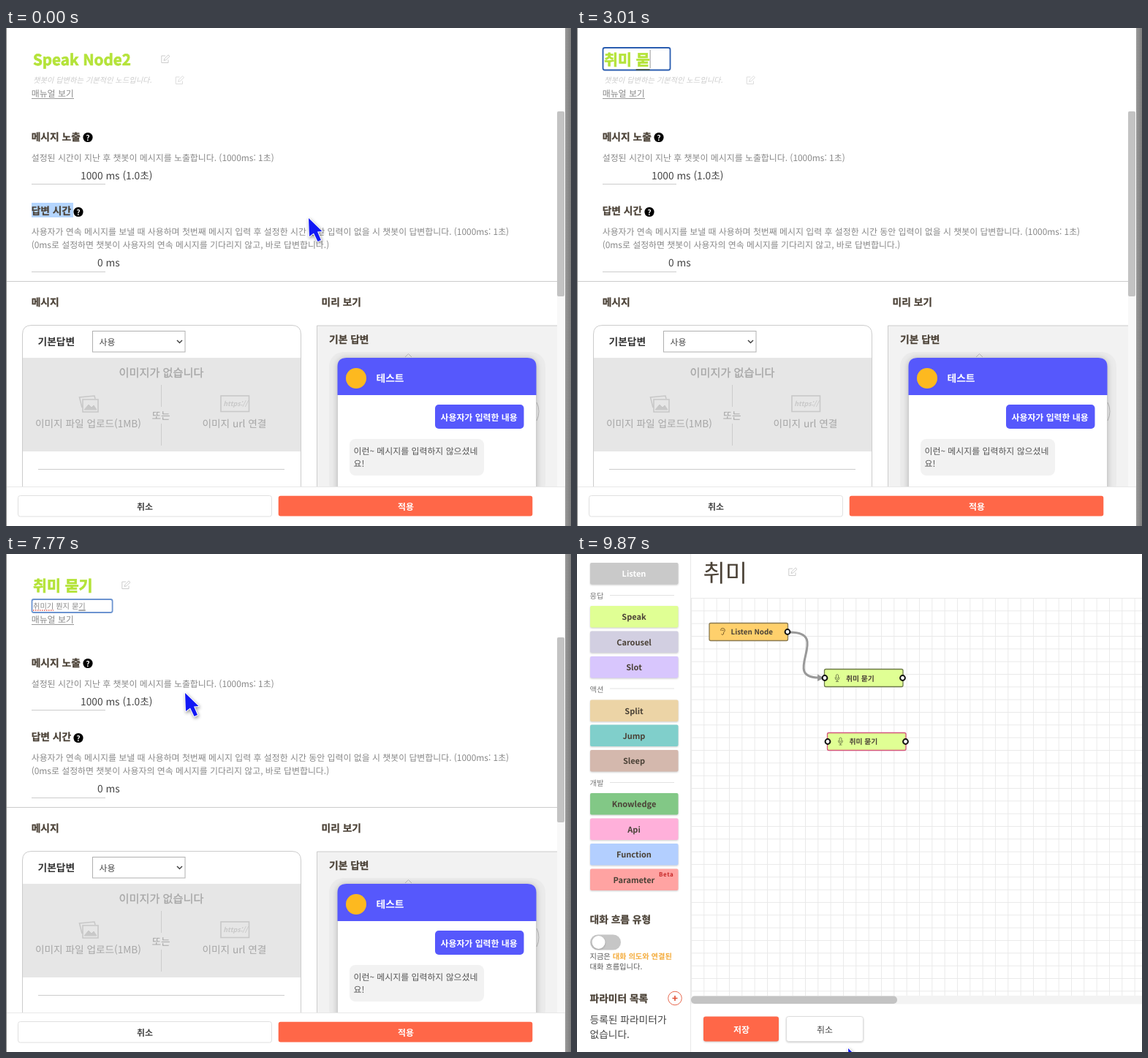
An HTML page for the animation above (9.94 s loop, 773 by 681 pixels).

```html
<!DOCTYPE html>
<html lang="ko">
<head>
<meta charset="utf-8">
<title>Node editor</title>
<style>
html, body { margin: 0; width: 100%; height: 100%; overflow: hidden; background: #fff; }
svg { display: block; width: 773px; height: 681px; }
text { font: 11.92px "Noto Sans CJK KR", "Noto Sans KR", "Noto Sans CJK", sans-serif; fill: #888; white-space: pre; text-rendering: geometricPrecision; }
.h { font-size: 13.75px; font-weight: 700; fill: #4b4237; stroke: #4b4237; stroke-width: .25; }
.b { font-weight: 700; }
.n { font-size: 13.75px; fill: #444; }
.m { text-anchor: middle; }
.g { font-size: 13.65px; fill: #a6a6a6; }
.s { font-size: 10.25px; fill: #555; }
.w { fill: #fff; }
.node { font-size: 9.8px; font-weight: 700; fill: #4b4237; }
#title text { font-size: 20.6px; font-weight: 900; fill: #b4e339; stroke: #b4e339; stroke-width: .7; }
#desc text { font-size: 10.25px; fill: #888; }
#desc .hint { font-style: italic; fill: #ccc; }
.line { fill: none; stroke: #ccc; }
.icon { fill: none; stroke: #ccc; stroke-linejoin: round; }
#desc .icon { stroke: #ddd; }
.soft { filter: drop-shadow(0 1px 1px #0003); }
.port { fill: #fff; stroke: #111; stroke-width: 2; }
#cursor { filter: drop-shadow(1px 2px 2px #0006); }
#cursor path { fill: #1218f5; stroke: #fff; stroke-width: 2; paint-order: stroke; stroke-linejoin: round; }
#cursor .bar { fill: none; stroke-width: 5; stroke-linecap: round; }
#cursor .ink { stroke: #1a35e0; stroke-width: 2.4; }
</style>
</head>
<body>
<svg viewBox="0 0 773 681">
  <defs>
    <path id="edit" d="M6 1.5H.8V11H10V7M4 8L4.8 5.4L10 .3L12 2.2L6.8 7.2Z"/>
    <path id="mic" d="M-1.5 -4Q0 -6 1.5 -4V0Q0 2 -1.5 0ZM-3 -1Q-3 3 0 3Q3 3 3 -1M0 3V5M-2 5H2" fill="none" stroke="#6d7a48" stroke-width=".9"/>
    <g id="help"><circle r="6.6"/><text class="b w m" y="4" style="font-size:10.5px">?</text></g>
    <linearGradient id="edge"><stop stop-color="#9a9a9a"/><stop offset="1" stop-color="#7c7c7c"/></linearGradient>
    <pattern id="grid" x="156" y="60" width="17.333" height="17.333" patternUnits="userSpaceOnUse">
      <path d="M0 .5H17.4M.5 0V17.4" stroke="#e9e9e9" fill="none"/>
    </pattern>
  </defs>

  <g id="modal">
    <rect width="773" height="681" fill="#fff"/>
    <g id="title">
      <rect class="mark" x="37" y="29" width="136" height="27" fill="#b4d5fe"/>
      <text x="37" y="51"></text>
      <rect class="box" x="35.5" y="27" height="30.5" rx="2.5" fill="none" stroke="#2a5db0" stroke-width="1.8"/>
      <path class="under" stroke="#3b4a1c" stroke-width="1.4"/>
      <path class="caret" stroke="#999"/>
      <use class="icon" href="#edit"/>
    </g>
    <g id="desc">
      <text x="37" y="74.5"></text>
      <rect class="box" x="35.5" y="62" height="18" rx="2.5" fill="none" stroke="#6c94d0" stroke-width="1.8"/>
      <path class="under" stroke="#555"/>
      <path class="caret" stroke="#888"/>
      <use class="icon" href="#edit"/>
      <path id="spell" d="M37 77H65" stroke="#e2574c" stroke-width="1.5" stroke-dasharray="1.5"/>
      <path id="rule" d="M37 80.5H154" stroke="#ddd"/>
    </g>
    <text x="34.7" y="94">매뉴얼 보기</text>
    <path d="M35 96.5H93" stroke="#999"/>

    <text class="h" x="34.7" y="154">메시지 노출</text><use href="#help" x="112" y="149.5"/>
    <text x="34.7" y="181.5">설정된 시간이 지난 후 챗봇이 메시지를 노출합니다. (1000ms: 1초)</text>
    <text class="n" x="102" y="206.5">1000 ms (1.0초)</text>
    <rect id="picked" x="35" y="239" width="57" height="20" fill="#b4d5fe"/>
    <text class="h" x="34.7" y="254.5">답변 시간</text><use href="#help" x="99" y="251.5"/>
    <text x="34.7" y="282.5">사용자가 연속 메시지를 보낼 때 사용하며 첫번째 메시지 입력 후 설정한 시간 동안 입력이 없을 시 챗봇이 답변합니다. (1000ms: 1초)</text>
    <text x="34.7" y="301">(0ms로 설정하면 챗봇이 사용자의 연속 메시지를 기다리지 않고, 바로 답변합니다.)</text>
    <text class="n" x="125" y="326">0 ms</text>
    <path class="line" d="M35 213.5H136M35 333.5H136M1 346.5H754"/>
    <text class="h" x="34.7" y="379.5">메시지</text>
    <text class="h" x="431.5" y="379.5">미리 보기</text>

    <path class="line" d="M22.5 628V419Q22.5 406.5 35 406.5H391Q403.5 406.5 403.5 419V628"/>
    <text class="h" x="43.5" y="434" style="fill:#333;stroke:none">기본답변</text>
    <rect x="118.5" y="414.5" width="126.5" height="28.5" fill="#fff" stroke="#b0b0b0"/>
    <text x="127.5" y="434" style="fill:#444">사용</text>
    <path d="M234 427L237.5 430.5L241 427" fill="none" stroke="#444" stroke-width="1.5"/>
    <rect x="23" y="451" width="380" height="128" fill="#e6e6e6"/>
    <text class="g m" x="212.5" y="477" style="font-size:15.2px;font-weight:500;stroke:#a6a6a6;stroke-width:.3">이미지가 없습니다</text>
    <path class="line" d="M212.5 488V518M212.5 541V571M44 603.5H381"/>
    <g fill="none" stroke="#c8c8c8" stroke-width="1.6">
      <path d="M104 519L100.5 505L121 503L122 507M105 508H126V525H105Z"/>
      <path d="M107 522L113 515L117 519L120 516L124 522Z" fill="#c8c8c8" stroke-width="1"/>
      <rect x="294" y="503" width="38.5" height="21.5"/>
    </g>
    <text class="b m" x="314" y="517" style="font-size:9px;font-style:italic;fill:#c8c8c8">https://</text>
    <text class="g" x="40" y="546">이미지 파일 업로드(1MB)</text>
    <text class="g" x="199.5" y="535">또는</text>
    <text class="g" x="268.5" y="546">이미지 url 연결</text>

    <rect x="425" y="407" width="329" height="221" fill="#f2f2f2"/>
    <path class="line" d="M425.5 628V407H754"/>
    <text class="h" x="442" y="431">기본 답변</text>
    <rect x="442" y="443" width="296" height="200" rx="20" fill="#ebebeb"/>
    <path d="M546 450L550.5 445.5L555 450M726 512Q732 524 726 537" fill="none" stroke="#bbb"/>
    <g style="filter:drop-shadow(0 1px 4px #0004)">
      <path d="M454 640V463Q454 451 466 451H713Q725 451 725 463V640Z" fill="#fff"/>
    </g>
    <path d="M453.5 502V463Q453.5 451 466 451H713Q725.5 451 725.5 463V502Z" fill="#5658fc"/>
    <circle cx="479" cy="479" r="14" fill="#fdb91f"/>
    <text class="h" x="506.5" y="484" style="fill:#fff;stroke:none">테스트</text>
    <rect x="587" y="515" width="121.5" height="33" rx="5" fill="#5658fc"/>
    <text class="b w" x="594.5" y="536.5">사용자가 입력한 내용</text>
    <rect x="470" y="562" width="184" height="50" rx="8" fill="#f2f2f2"/>
    <text x="475.5" y="583" style="fill:#555">이런~ 메시지를 입력하지 않으셨네</text>
    <text x="475.5" y="600" style="fill:#555">요!</text>

    <rect x="754" y="114" width="10" height="514" fill="#f8f8f8"/>
    <rect x="754" y="114" width="10" height="253" rx="2" fill="#c3c3c3"/>
    <rect y="628" width="773" height="53" fill="#fff"/>
    <path d="M1 627.5H765" stroke="#e8e8e8"/>
    <rect x="16.5" y="639.5" width="347" height="28.5" rx="3" fill="#fff" stroke="#e0e0e0"/>
    <text class="b m" x="190" y="658.5" style="fill:#444">취소</text>
    <rect id="apply" x="372.7" y="639.8" width="347.6" height="27.8" rx="3" fill="#ff6748"/>
    <text class="b w m" x="547" y="658.5">적용</text>
    <rect x="765" width="8" height="681" fill="url(#edge)"/>
    <rect width="1" height="681" fill="#8a8a8a"/>
  </g>

  <g id="flow">
    <rect width="773" height="681" fill="#fff"/>
    <rect x="156" y="60" width="617" height="544" fill="url(#grid)"/>
    <path d="M155.5 0V681" stroke="#e8e8e8"/>
    <g id="palette"></g>
    <text class="h" x="17.5" y="505">대화 흐름 유형</text>
    <rect x="18" y="520.5" width="42" height="21" rx="10.5" fill="#c6c6c6"/>
    <circle class="soft" cx="29.5" cy="531" r="9" fill="#fff"/>
    <text class="s" x="17.5" y="553.5">지금은 <tspan font-weight="700" fill="#f4ac3c">대화 의도와 연결된</tspan></text>
    <text class="s" x="17.5" y="568">대화 흐름입니다.</text>
    <text class="h" x="17.5" y="613">파라미터 목록</text>
    <circle cx="134" cy="607.5" r="9.3" fill="#fff" stroke="#e8694f"/>
    <path d="M130.5 607.5H137.5M134 604V611" stroke="#e04f35" stroke-width="1.6"/>
    <text class="n" x="17.5" y="642">등록된 파라미터가</text>
    <text class="n" x="17.5" y="662">없습니다.</text>

    <text x="172.5" y="37.5" style="font-size:33px;font-weight:300;fill:#4b4237">취미</text>
    <use class="icon" href="#edit" x="289" y="18.5"/>
    <path d="M291 107C349 107 278 169 331 169" fill="none" stroke="#999" stroke-width="3"/>
    <path d="M329 164.5L338 169.5L329 174Z" fill="#999"/>
    <g id="nodes"></g>
    <path d="M197 105Q196 101.5 199.5 101.5Q203 102 202 105.5Q200 107 200.5 109.5Q199 111.5 197.5 109.5M198.5 105Q199.5 102.5 200.5 105" fill="none" stroke="#7a5c28"/>
    <use href="#mic" x="356" y="169.5"/><use href="#mic" x="360.5" y="256"/>
    <text class="node" x="210.5" y="109.5">Listen Node</text>
    <text class="node" x="368" y="173.5">취미 묻기</text>
    <text class="node" x="372.5" y="260">취미 묻기</text>

    <rect x="156" y="604" width="617" height="11.5" fill="#f3f3f3"/>
    <rect x="156" y="604.5" width="282" height="10.5" rx="5" fill="#c3c3c3"/>
    <rect class="soft" x="173" y="632.5" width="103" height="34" rx="3" fill="#ff6748"/>
    <text class="b w m" x="225" y="654.5">저장</text>
    <rect class="soft" x="286.5" y="632.5" width="105" height="34" rx="3" fill="#fff" stroke="#ddd"/>
    <text class="m" x="339" y="654.5" style="font-weight:500;fill:#444">취소</text>
  </g>

  <g id="cursor">
    <path data-kind="arrow" d="M0 0L1 25L7 20.5L12.5 32L17 30L12 18.5L18.5 18Z"/>
    <g data-kind="beam">
      <path class="bar" d="M-6 -15Q0 -15 0 -9Q0 -15 6 -15M0 -9V9M-6 15Q0 15 0 9Q0 15 6 15M-3 1H3"/>
      <path class="bar ink" d="M-6 -15Q0 -15 0 -9Q0 -15 6 -15M0 -9V9M-6 15Q0 15 0 9Q0 15 6 15M-3 1H3"/>
    </g>
    <g data-kind="hand">
      <path d="M-2 1.5C-1.5 -1.5 2 -1.5 3 1.5L6 9C8 6.5 11 7 12 9.5C14 7.5 17 8.5 18 11C20 10 22 12 22 15V27H4L-5 18C-6 14 -2 13 0 15L2 16Z"/>
      <path d="M7.5 10.5L9 15M13 11L14 15.5M18 13L18.5 16.5" style="stroke-width:1"/>
    </g>
  </g>
</svg>
<script>
const LOOP = 9940, STEP = 70, CLOSE = 8890;
const $ = (sel, root = document) => root.querySelector(sel);
const show = (el, on) => { el.style.display = on ? '' : 'none'; };
const set = (el, attrs) => { for (const k in attrs) el.setAttribute(k, attrs[k]); };

// Keystrokes: start, gap, fixed head, successive tails ("_" is a space)
const keys = runs => runs.flatMap(([start, gap, head, tails]) =>
  tails.split(' ').map((tail, i) => [start + i * gap, (head + tail).replace(/_/g, ' ')]));

const title = {
  el: $('#title'), on: 980, off: 4130, text: 'Speak Node2', caret: 9, width: 190, pad: 26, per: 22,
  top: 30, bottom: 55, line: 57, iconX: 13.5, iconY: 36.5,
  keys: keys([
    [2030, 105, '', 'ㅊ 추 취 췸 취미'],
    [2660, 116, '취미_', ' ㅁ 무 묻'],
    [3080, 70, '취미_', '묻ㄱ 묻기']])
};
const desc = {
  el: $('#desc'), on: 4130, off: 8470, text: '챗봇이 답변하는 기본적인 노드입니다.', caret: 0, width: 208.5, pad: 44.5, per: 8.2,
  top: 64, bottom: 78, line: 77, iconX: 12.5, iconY: 65.5,
  keys: keys([
    [4830, 130, '', 'ㅊ 추 취 췸 취미 취믹 취미기'],
    [5740, 140, '취미기_', ' ㅁ 무 뭐 뭔 뭔ㅈ 뭔지'],
    [6650, 70, '취미기_뭔지_', ''],
    [6790, 87, '취미기_뭔지_', 'ㅁ 무 묻 묻ㄱ 묻기']])
};

function drawField(f, t) {
  const label = $('text', f.el), active = t >= f.on && t < f.off;
  const typed = f.keys.filter(k => k[0] <= t).pop();
  const [since, text] = typed || [f.on, f.text];
  const composing = active && !!typed && !text.endsWith(' ');
  const width = typed ? f.pad + f.per * (text.length - composing) : f.width;
  if (label.textContent !== text) label.textContent = text;
  label.classList.toggle('hint', !typed);

  const xAt = n => 37 + (n ? label.getSubStringLength(0, n) : 0);
  const end = xAt(typed ? text.length : f.caret);
  const box = $('.box', f.el), under = $('.under', f.el), caret = $('.caret', f.el), icon = $('.icon', f.el);
  set(box, { width });
  set(icon, { x: 35.5 + width - f.iconX, y: f.iconY });
  set(caret, { d: `M${end + .5} ${f.top}V${f.bottom}` });
  if (composing) set(under, { d: `M${xAt(text.length - 1)} ${f.line}H${end}` });
  show(box, active);
  show(icon, !active);
  show(under, composing);
  show(caret, active && (t - since) % 1060 < 530);
}

// Pointer: time, x, y
const path = [
  [0, 414, 260], [350, 414, 260], [560, 330, 165], [840, 165, 20], [980, 149, 40], [1190, 163, 65],
  [3430, 163, 65], [3780, 175, 38], [4130, 167, 71], [4410, 166, 78],
  [7490, 166, 78], [7770, 245, 190], [8050, 420, 435], [8330, 572, 648], [8470, 581, 663],
  [8960, 581, 663], [9520, 278, 655], [9870, 371, 676], [LOOP, 371, 676]
];
function pointer(t) {
  const i = path.findIndex(p => p[0] > t), a = path[i - 1], b = path[i];
  const u = (t - a[0]) / (b[0] - a[0]);
  return [1, 2].map(k => a[k] + (b[k] - a[k]) * u);
}
function kindAt(x, y, t) {
  if (t >= CLOSE) return x > 286 && x < 392 && y > 632 && y < 667 ? 'hand' : 'arrow';
  if (y > 640) return 'hand';
  return x < 226 && y < 85 ? 'beam' : 'arrow';
}

function draw(t) {
  drawField(title, t);
  drawField(desc, t);
  show($('.mark'), t >= 1400 && t < 2030);
  show($('#picked'), t < title.on);
  show($('#spell'), t >= 5740 && t < desc.off);
  show($('#rule'), t >= desc.off);
  show($('#flow'), t >= CLOSE);

  const [x, y] = pointer(t), kind = kindAt(x, y, t);
  $('#apply').style.filter = y > 640 ? 'drop-shadow(0 2px 3px #0006)' : '';
  set($('#cursor'), { transform: `translate(${x} ${y})` });
  show($('#cursor'), !(t >= 2030 && t < 3430 || t >= 4830 && t < 7490));
  for (const el of $('#cursor').children) show(el, el.dataset.kind === kind);
}

// Flow screen: palette buttons and nodes
const button = ([y, name, color]) => `<rect class="soft" x="18" y="${y}" width="120.5" height="29.5" rx="2" fill="${color}"/>
  <text class="b m" x="78" y="${y + 19}" style="font-size:11px;fill:${name === 'Listen' ? '#fff' : '#4b4237'}">${name}</text>`;
const group = ([y, name]) => `<text class="s" x="17.5" y="${y + 4}" style="fill:#777">${name}</text>
  <path d="M45 ${y - .5}H133" stroke="#e2e2e2"/>`;
$('#palette').innerHTML = [
  [12, 'Listen', '#c9c9c9'], [71, 'Speak', '#e0ff94'], [105.5, 'Carousel', '#d2cfe1'], [140, 'Slot', '#d8c6fd'],
  [199.5, 'Split', '#ecd4a6'], [233.5, 'Jump', '#80cfcb'], [268, 'Sleep', '#d4b8ad'],
  [327, 'Knowledge', '#82c886'], [361.5, 'Api', '#ffb0da'], [396, 'Function', '#b3cfff'], [430.5, 'Parameter', '#ffa3a2']
].map(button).join('') + [[57, '응답'], [184.5, '액션'], [313, '개발']].map(group).join('') +
  '<text class="b" x="112" y="441" style="font-size:8px;letter-spacing:.6px;fill:#c62828">Beta</text>';

const port = (x, y) => `<circle class="port" cx="${x}" cy="${y}" r="3.4"/>`;
$('#nodes').innerHTML = [
  [181, 94.5, '#ffd06c', '#8a7a50', 0], [338.5, 157.5, '#e0ff94', '#6d7a48', 1], [342.5, 244.5, '#e0ff94', '#d4567c', 1]
].map(([x, y, fill, stroke, input]) =>
  `<rect x="${x}" y="${y}" width="107.5" height="24" rx="2" fill="${fill}" stroke="${stroke}" stroke-width="1.3"/>` +
  (input ? port(x + .5, y + 12) : '') + port(x + 107, y + 12)).join('');

const born = performance.now();
function tick() {
  const t = (performance.now() - born) % LOOP;
  draw(Math.floor(t / STEP) * STEP);
  requestAnimationFrame(tick);
}
tick();
</script>
</body>
</html>
```
